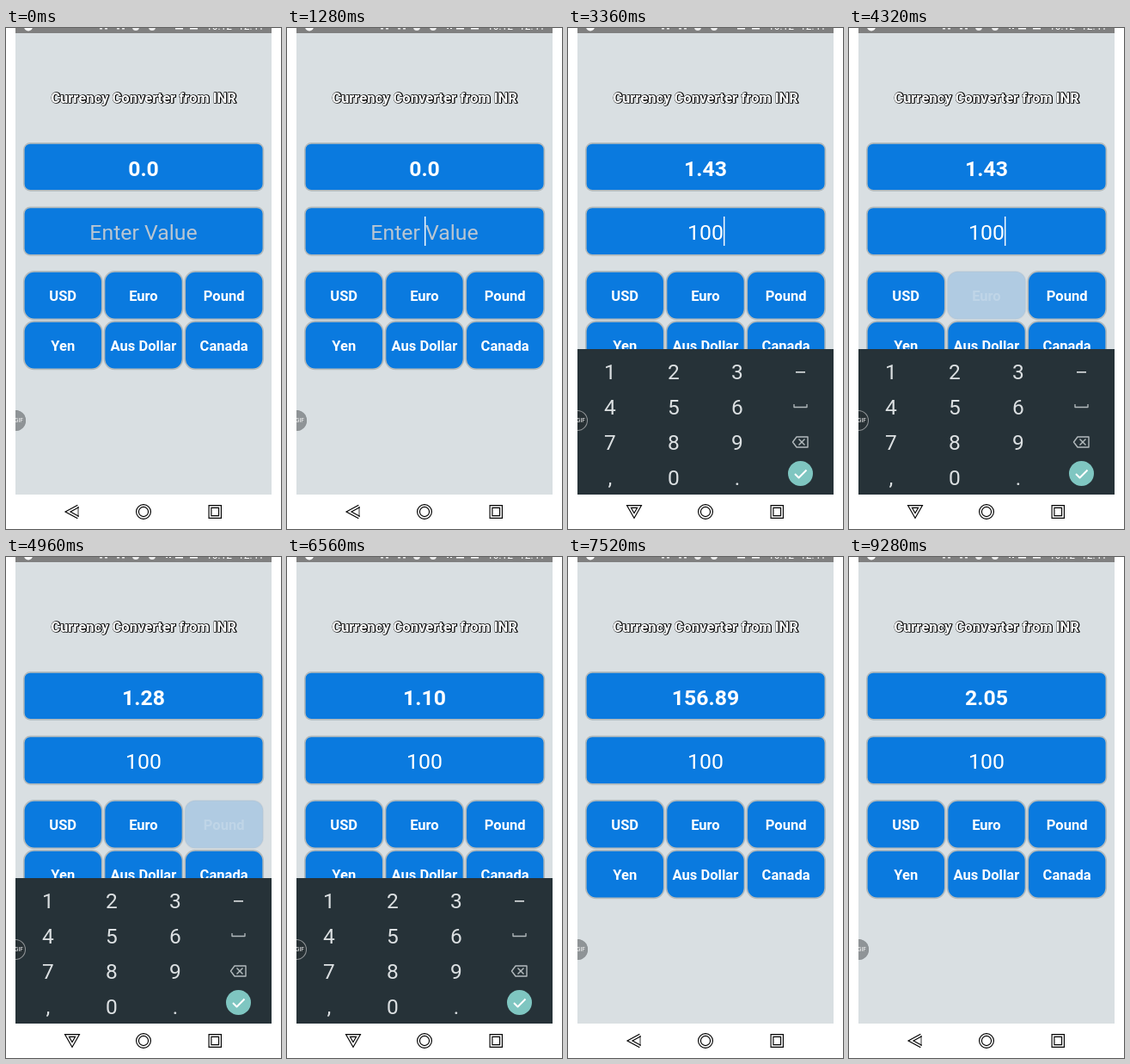
These frames come from a looping animation (320x582 px, 9.6 s). An HTML page with a canvas:

```html
<!DOCTYPE html>
<html lang="en">
<head>
<meta charset="utf-8">
<title>Currency converter</title>
<style>
html, body { margin: 0; width: 100%; height: 100%; overflow: hidden; background: #fff; }
canvas { display: block; width: 320px; height: 582px; }
</style>
</head>
<body>
<canvas id="stage"></canvas>
<script>
const W = 320, H = 582, LOOP = 9600, TICK = 160;
const BLUE = '#0a7adf', PAGE = '#d9dfe2', EDGE = '#b3babc', DARK = '#263238';
const FONT = 'Roboto, sans-serif';
const canvas = document.getElementById('stage');
const ctx = canvas.getContext('2d');
const ratio = window.devicePixelRatio || 1;
canvas.width = W * ratio;
canvas.height = H * ratio;

// Each track lists [start time, value]; the value holds until the next entry.
const tracks = {
  result: [[0, '0.0'], [3200, '1.43'], [4480, '1.28'], [5280, '1.10'], [7360, '156.89'], [9120, '2.05']],
  entry: [[0, ''], [1920, '1'], [2240, '10'], [2400, '100']],
  caret: [[0, 0], [1280, 1], [2880, 0], [3200, 1], [3840, 0], [4320, 1], [4640, 0], [5120, 1], [5760, 0]],
  key: [[0, ''], [1760, '1'], [1920, ''], [2080, '0'], [2400, '']],
  keyboard: [[0, 0], [1440, 0.55], [1600, 1], [6720, 0.45], [6880, 0]],
  signal: [[0, 0], [160, 1], [2880, 0], [4160, 1], [7200, 0], [8800, 1]]
};

const slow = [0.2, 0.2, 0.6], quick = [0.2, 0.6];
const buttons = [
  { label: 'USD', at: 2880, fade: slow },
  { label: 'Euro', at: 4160, fade: slow },
  { label: 'Pound', at: 4960, fade: slow },
  { label: 'Yen', at: 7200, fade: quick },
  { label: 'Aus Dollar', at: 8800, fade: slow },
  { label: 'Canada' }
];

function valueAt(track, t) {
  let value = track[0][1];
  for (const [start, v] of track) if (t >= start) value = v;
  return value;
}

function text(str, x, y, size, color, weight = 400) {
  ctx.font = `${weight} ${size}px ${FONT}`;
  ctx.fillStyle = color;
  ctx.textAlign = 'center';
  ctx.fillText(str, x, y);
}

function rect(x, y, w, h, color) {
  ctx.fillStyle = color;
  ctx.fillRect(x, y, w, h);
}

function panel(x, y, w, h, r) {
  ctx.beginPath();
  ctx.roundRect(x, y, w, h, r);
  ctx.fillStyle = BLUE;
  ctx.fill();
  ctx.strokeStyle = EDGE;
  ctx.lineWidth = 1.7;
  ctx.stroke();
}

function line(points, color, width, close) {
  ctx.beginPath();
  points.forEach(([x, y]) => ctx.lineTo(x, y));
  if (close) ctx.closePath();
  ctx.strokeStyle = color;
  ctx.lineWidth = width;
  ctx.stroke();
}

function disc(x, y, r, color) {
  ctx.beginPath();
  ctx.arc(x, y, r, 0, Math.PI * 2);
  ctx.fillStyle = color;
  ctx.fill();
}

function statusBar(signal) {
  rect(11, 0, 298, 6, '#808080');
  disc(26, -1.5, 5, '#fff');
  for (const x of [109, 115, 129, 135]) rect(x, 0, 3, 1.5, '#eee');
  for (const x of [151, 170]) disc(x, -1, 4, '#eee');
  if (signal) {
    rect(186, 0, 2, 1, '#fff');
    rect(190, 0, 2, 1, '#fff');
  }
  rect(197, 0, 9, 1.5, '#fff');
  rect(214, 0, 9, 1.5, '#fff');
  text('10:12', 248, 1.5, 12, '#fff');
  text('12:41', 285, 1.5, 12, '#fff');
}

function title() {
  const str = 'Currency Converter from INR';
  ctx.font = `700 16.56px ${FONT}`;
  ctx.textAlign = 'center';
  ctx.lineJoin = 'round';
  ctx.strokeStyle = '#000';
  ctx.lineWidth = 1.6;
  ctx.strokeText(str, 160.5, 87);
  text(str, 160, 86.5, 16.56, '#fff', 700);
}

function buttonAlpha(button, t) {
  if (button.at === undefined || t < button.at) return 1;
  return button.fade[(t - button.at) / TICK] ?? 1;
}

function form(t) {
  panel(20.8, 133.8, 278.6, 55, 7.5);
  text(valueAt(tracks.result, t), 160, 172, 24.84, '#fff', 700);

  panel(20.8, 208.3, 278.6, 55.5, 7.5);
  const entry = valueAt(tracks.entry, t);
  text(entry || 'Enter Value', 160, 246, 24.84, entry ? '#fff' : '#b9c6d2');
  if (valueAt(tracks.caret, t)) {
    const half = entry ? ctx.measureText(entry).width / 2 : 0;
    rect(Math.round(160 + half), 219, 1.4, 34, '#fff');
  }

  buttons.forEach((button, i) => {
    const x = 20.8 + (i % 3) * 93.7, y = 282.8 + Math.floor(i / 3) * 58;
    ctx.globalAlpha = buttonAlpha(button, t);
    panel(x, y, 91, 55.5, 12);
    text(button.label, x + 45.4, y + 34.3, 16.56, '#fff', 700);
    ctx.globalAlpha = 1;
  });
}

function keyboard(shown, pressed) {
  if (!shown) return;
  const ink = '#dce0e2', soft = '#b4bbbe';
  ctx.save();
  ctx.beginPath();
  ctx.rect(11, 6, 298, 536);
  ctx.clip();
  ctx.translate(0, (1 - shown) * 169);
  rect(11, 373, 298, 169, DARK);
  ['123', '456', '789', ',0.'].forEach((row, r) => {
    [...row].forEach((key, c) => {
      const x = 49 + c * 74, y = 399.5 + r * 41;
      if (key === pressed) rect(x - 37, y - 21, 74, 41, '#3d484d');
      text(key, x, y + 8.5, 24.5, ink);
    });
  });
  rect(265, 399, 11, 1.6, ink);
  line([[263, 437], [263, 440.5], [278, 440.5], [278, 437]], soft, 1.3);
  line([[261.5, 481], [266, 475], [279, 475], [279, 487], [266, 487]], soft, 1.4, true);
  line([[268.5, 477.5], [275.5, 484.5]], soft, 1.4);
  line([[275.5, 477.5], [268.5, 484.5]], soft, 1.4);
  disc(270.5, 517.5, 14.5, '#7fc6c1');
  line([[264, 518], [268.5, 522.5], [277.5, 513.5]], '#fff', 2);
  ctx.restore();
}

function handle() {
  ctx.save();
  ctx.beginPath();
  ctx.rect(11, 6, 298, 536);
  ctx.clip();
  disc(11, 456, 12, 'rgba(40,45,48,.42)');
  ctx.strokeStyle = '#8d9295';
  ctx.lineWidth = 1.1;
  ctx.beginPath();
  ctx.arc(11, 456, 11.5, 0, Math.PI * 2);
  ctx.stroke();
  text('GIF', 15, 458.3, 6.5, '#fff');
  ctx.restore();
}

// Strokes a shape as a white band with black rims.
function hollow(path) {
  ctx.lineJoin = 'miter';
  for (const [color, width] of [['#000', 4], ['#fff', 1.7]]) {
    ctx.beginPath();
    path();
    ctx.strokeStyle = color;
    ctx.lineWidth = width;
    ctx.stroke();
  }
}

function navBar(open) {
  rect(11, 542, 298, 40, '#fff');
  if (open) {
    hollow(() => {
      ctx.moveTo(71, 556);
      ctx.lineTo(83, 556);
      ctx.lineTo(77, 566.5);
      ctx.closePath();
    });
  } else {
    hollow(() => {
      ctx.moveTo(84, 555.5);
      ctx.lineTo(72, 562);
      ctx.lineTo(84, 568.5);
    });
    line([[84, 556], [84, 568]], '#000', 0.8);
  }
  hollow(() => ctx.arc(160, 562, 7, 0, Math.PI * 2));
  hollow(() => ctx.rect(237.5, 556, 11.5, 12));
}

function draw(time) {
  const t = Math.floor((time % LOOP) / TICK) * TICK;
  const shown = valueAt(tracks.keyboard, t);
  ctx.setTransform(ratio, 0, 0, ratio, 0, 0);
  rect(0, 0, W, H, '#fff');
  rect(11, 6, 298, 536, PAGE);
  statusBar(valueAt(tracks.signal, t));
  title();
  form(t);
  keyboard(shown, valueAt(tracks.key, t));
  handle();
  navBar(shown > 0);
}

let begin;
function loop(now) {
  begin ??= now;
  draw(now - begin);
  requestAnimationFrame(loop);
}
draw(0);
requestAnimationFrame(loop);
</script>
</body>
</html>
```
